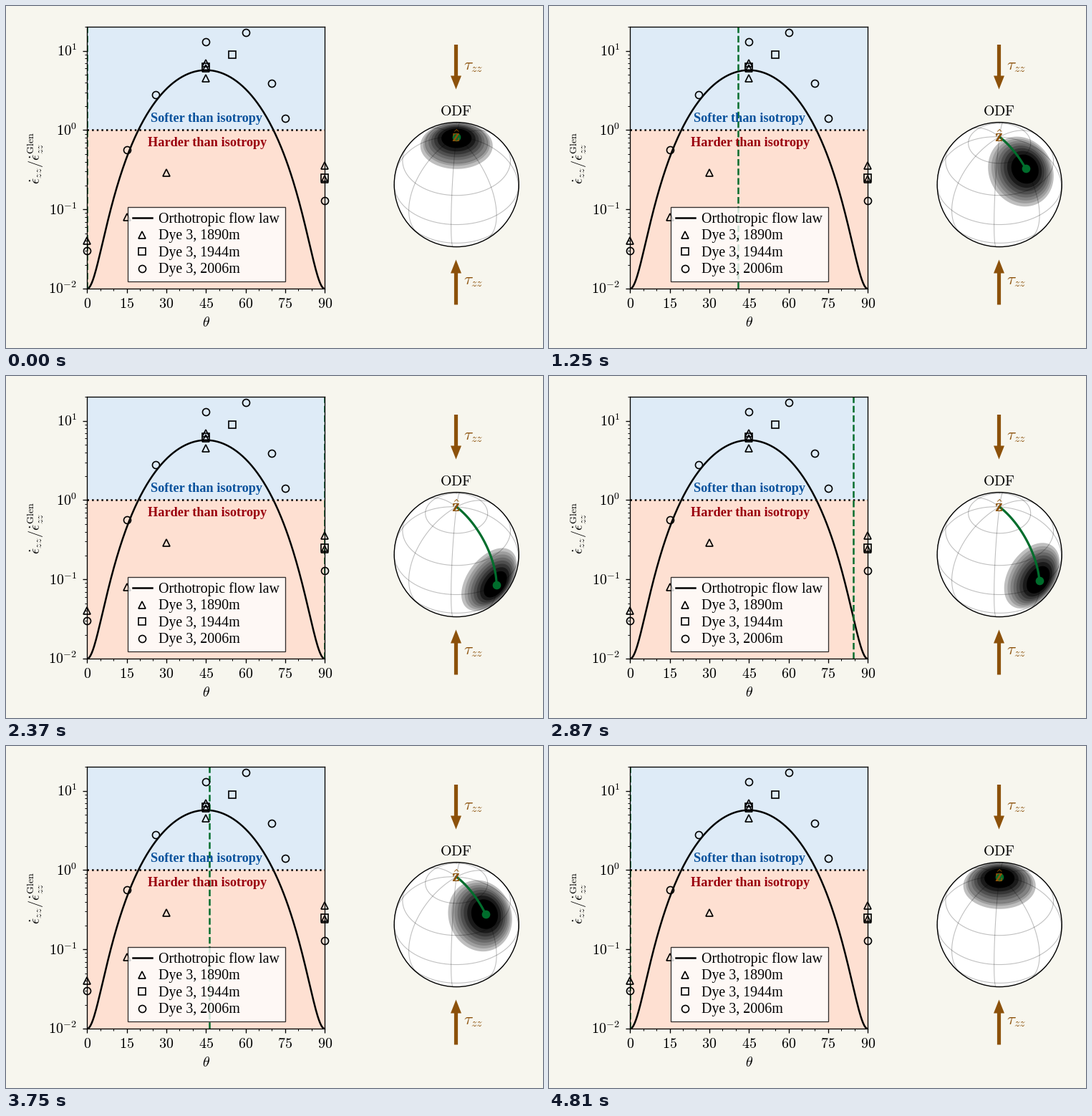
A matplotlib script that plays this animation: 750 by 478 pixels, repeating every 4.87 s.

```python
import numpy as np
import matplotlib.pyplot as plt
from matplotlib.animation import FuncAnimation
from matplotlib.patches import Circle, Polygon, Rectangle
from matplotlib.ticker import FixedLocator, MultipleLocator, NullFormatter

W, H, DPI = 750, 478, 128
PX = 72 / DPI                      # points per pixel
LOOP, STEPS, SUB = 4870, 78, 3     # each pose is held for SUB frames
HOLD_LOW, RISE, HOLD_HIGH = 5, 33, 6

PAPER, BLUE, PINK = "#f7f6ee", "#deebf7", "#fee0d2"
GREEN, BROWN = "#006d2c", "#8c510a"
LAT0, LON_TILT = np.radians(40), np.radians(40)
CX, CY, R = 629.2, 249.6, 87

plt.rcParams.update({
    "font.family": "Liberation Serif",
    "mathtext.fontset": "cm",
    "axes.linewidth": 1.33 * PX,
})

fig = plt.figure(figsize=(W / DPI, H / DPI), dpi=DPI, facecolor=PAPER)

# Layer in pixel coordinates for everything outside the plot data
stage = fig.add_axes([0, 0, 1, 1], zorder=2)
stage.set(xlim=(0, W), ylim=(H, 0))
stage.axis("off")


def label(x, y, text, size=20, color="k", ha="center", **kw):
    return stage.text(x, y, text, fontsize=size * PX, color=color, ha=ha,
                      va="baseline", **kw)


# ---- Enhancement plot ----
X0, X1, Y0, Y1 = 113.2, 445.2, 395.2, 29.2
ax = fig.add_axes([X0 / W, 1 - Y0 / H, (X1 - X0) / W, (Y0 - Y1) / H], zorder=1)
ax.set_yscale("log")
ax.set(xlim=(0, 90), ylim=(1e-2, 20))
ax.axhspan(1, 20, color=BLUE, lw=0, zorder=0)
ax.axhspan(1e-2, 1, color=PINK, lw=0, zorder=0)

theta = np.linspace(0, 90, 400)
flow = (0.1 + 2.287 * np.sin(np.radians(2 * theta)) ** 2) ** 2
ax.plot(theta, flow, "k-", lw=2.5 * PX)
ax.axhline(1, color="k", ls=":", lw=2.5 * PX)

SAMPLES = [
    ("^", "Dye 3, 1890m", [(0, .04), (15, .08), (30, .29), (45, 4.5),
                           (45, 7.0), (45, 6.0), (90, .24), (90, .36)]),
    ("s", "Dye 3, 1944m", [(45, 6.3), (55, 9), (90, .25)]),
    ("o", "Dye 3, 2006m", [(0, .03), (15, .56), (26, 2.8), (45, 13),
                           (60, 17), (70, 3.9), (75, 1.4), (90, .13)]),
]
MARK = dict(ls="none", ms=10 * PX, mew=1.67 * PX, mfc="none", mec="k")
for marker, _, points in SAMPLES:
    ax.plot(*zip(*points), marker=marker, clip_on=False, zorder=3, **MARK)

cursor = ax.axvline(0, color=GREEN, ls="--", lw=2.5 * PX)

ax.xaxis.set_major_locator(FixedLocator(range(0, 91, 15)))
ax.xaxis.set_minor_locator(MultipleLocator(5))
for axis in (ax.xaxis, ax.yaxis):
    axis.set_major_formatter(NullFormatter())
    axis.set_minor_formatter(NullFormatter())
ax.tick_params(which="major", length=5.8 * PX, width=1.33 * PX)
ax.tick_params(which="minor", length=3.3 * PX, width=1.0 * PX)

for deg in range(0, 91, 15):
    label(X0 + deg / 90 * (X1 - X0), 421.6, f"${deg}$")
decade = (Y0 - Y1) / np.log10(2000)
for k in range(-2, 2):
    label(99.5, Y0 - (k + 2) * decade + 7.3, f"$10^{{{k}}}$", ha="right")
label(279.2, 448, r"$\theta$")
label(48, 213, r"$\dot{\epsilon}_{zz}/\dot{\epsilon}_{zz}^{\mathrm{Glen}}$",
      rotation=90, rotation_mode="anchor")
label(280.2, 162.3, "Softer than isotropy", 18.33, "#08519c", weight="bold")
label(281, 195.5, "Harder than isotropy", 18.33, "#99000d", weight="bold")

# ---- Legend ----
stage.add_patch(Rectangle((169.5, 280.8), 220.5, 104.5, fc="w", ec="k",
                          alpha=0.8, lw=1.33 * PX))
stage.plot([177, 204], [296, 296], "k-", lw=2.5 * PX)
label(213.2, 302.5, "Orthotropic flow law", ha="left")
for i, (marker, name, _) in enumerate(SAMPLES):
    y = 319.6 + 23.5 * i
    stage.plot(190.4, y, marker=marker, **MARK)
    label(213.2, y + 6.6, name, ha="left")


# ---- Globe ----
def vector(lat, lon):
    """Unit vectors in view axes: right, up, towards the viewer."""
    x = np.cos(lat) * np.sin(lon)
    y, z = np.sin(lat), np.cos(lat) * np.cos(lon)
    return np.array([x,
                     np.cos(LAT0) * y - np.sin(LAT0) * z,
                     np.sin(LAT0) * y + np.cos(LAT0) * z])


def to_stage(v):
    return CX + R * v[0], CY - R * v[1]


def grid_line(lat, lon):
    v = vector(*np.broadcast_arrays(lat, lon))
    x, y = to_stage(v)
    stage.plot(np.where(v[2] >= 0, x, np.nan), y, color="k", alpha=0.25,
               lw=1.1 * PX, zorder=3)


def cap_outline(center, radius):
    """Small circle about center; its hidden part follows the limb."""
    u = np.cross(center, [0.3, -0.8, 0.5])
    u /= np.linalg.norm(u)
    w = np.cross(center, u)
    a = np.linspace(0, 2 * np.pi, 150)
    v = (np.cos(radius) * center[:, None]
         + np.sin(radius) * (np.outer(u, np.cos(a)) + np.outer(w, np.sin(a))))
    v[:2] /= np.where(v[2] < 0, np.hypot(v[0], v[1]), 1)
    return np.column_stack(to_stage(v))


stage.add_patch(Circle((CX, CY), R, fc="w", ec="none", zorder=1))

RADII = np.radians([35.5, 32.4, 29.6, 26.8, 24, 21, 17.8, 14])
SHADES = [0.75, 0.62, 0.51, 0.41, 0.31, 0.21, 0.1, 0]
caps = [stage.add_patch(Polygon([(0, 0)], closed=True, fc=str(s), ec="none",
                                zorder=2)) for s in SHADES]

arc = np.linspace(-np.pi, np.pi, 181)
for lat in np.radians(range(-60, 61, 30)):
    grid_line(lat, arc)
for lon in np.radians(range(0, 360, 45)):
    grid_line(arc / 2, LON_TILT + lon)
stage.add_patch(Circle((CX, CY), R, fc="none", ec="k", lw=1.4 * PX, zorder=4))

trail, = stage.plot([], [], color=GREEN, lw=3.2 * PX, zorder=5)
dot, = stage.plot([], [], "o", color=GREEN, ms=10 * PX, mew=1.67 * PX,
                  zorder=5)
label(628.5, 190, r"$\hat{\mathbf{z}}$", 25, BROWN, zorder=6)
label(628.8, 152.6, r"$\mathrm{ODF}$")


def stress(tail, tip, baseline):
    s = np.sign(tip - tail)
    neck = tip - 19 * s
    half = np.array([(2.6, tail), (2.6, neck), (7.5, neck), (0, tip)])
    outline = np.vstack([half, half[::-1] * [-1, 1]]) + [628.5, 0]
    stage.add_patch(Polygon(outline, fc=BROWN, ec="none"))
    label(638.7, baseline, r"$\tau_{zz}$", 23.3, BROWN, ha="left")


stress(54, 116.5, 89.5)
stress(417.5, 354.5, 389)


# ---- Motion ----
def angle(step):
    up = np.clip((step - HOLD_LOW) / RISE, 0, 1)
    down = np.clip((step - HOLD_LOW - RISE - HOLD_HIGH) / RISE, 0, 1)
    return 90 * (up - down)


def draw(n):
    deg = angle((n + 1) // SUB)
    cursor.set_xdata([deg, deg])
    lat = np.radians(90 - np.linspace(0, deg, 60))
    x, y = to_stage(vector(lat, LON_TILT))
    trail.set_data(x, y)
    dot.set_data(x[-1:], y[-1:])
    center = vector(lat[-1], LON_TILT)
    for cap, radius in zip(caps, RADII):
        cap.set_xy(cap_outline(center, radius))
    return [cursor, trail, dot, *caps]


frames = STEPS * SUB
anim = FuncAnimation(fig, draw, frames=frames, interval=LOOP / frames,
                     repeat=True, repeat_delay=0, blit=False)
plt.show()
```
